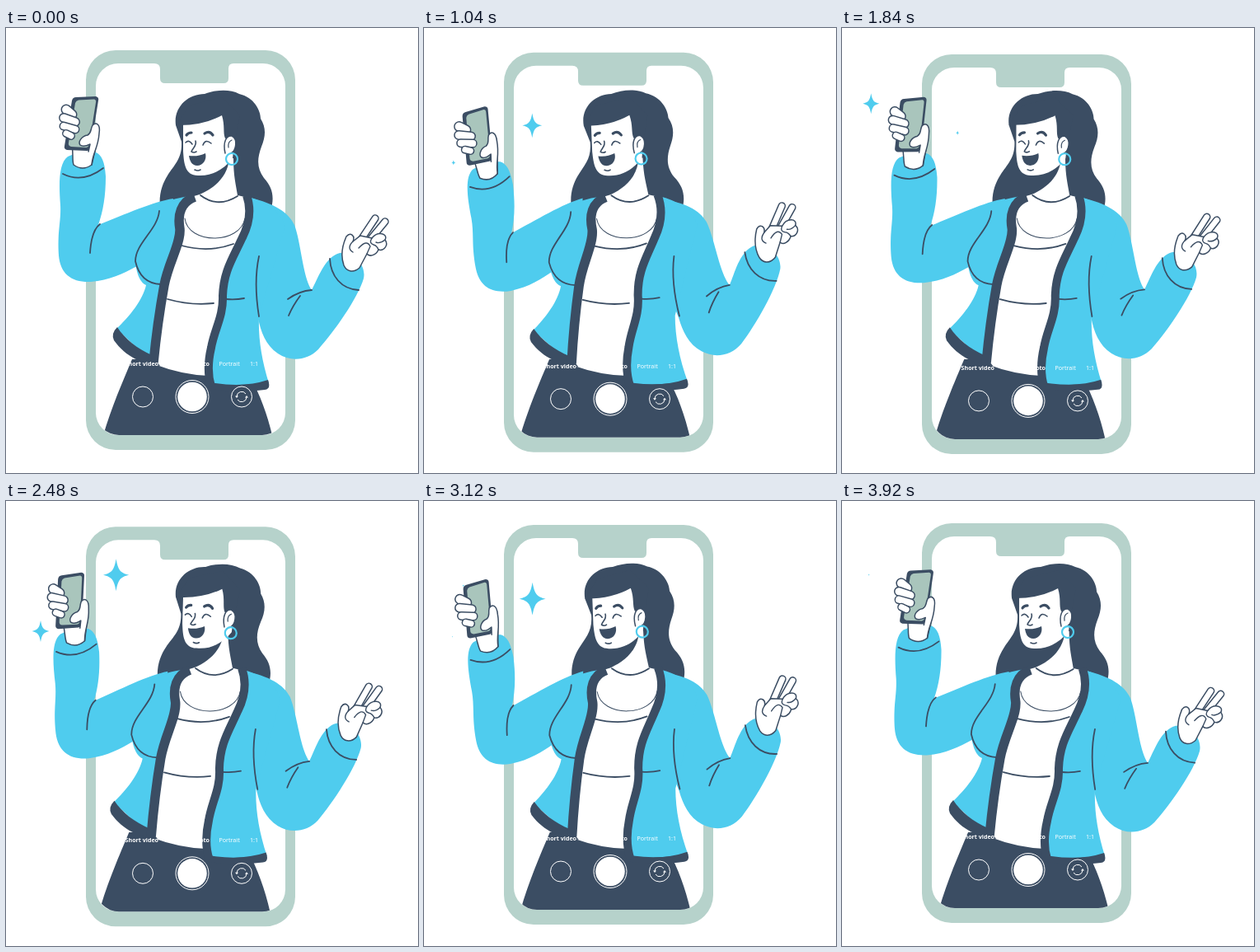
Write an HTML page that moves like this. It is 500 px wide and 540 px high and loops after 4 s.

```html
<!DOCTYPE html>
<html lang="en">
<head>
<meta charset="utf-8">
<title>Selfie</title>
<style>
html, body { margin: 0; width: 100%; height: 100%; overflow: hidden; background: #fff; }
svg { display: block; width: 500px; height: 540px; }
.ink { fill: #3b4d63; }
.sky { fill: #4fccee; }
.mint { fill: #b6d2cb; }
.white { fill: #fff; }
.line { fill: none; stroke: #3b4d63; stroke-width: 1.8; stroke-linecap: round; stroke-linejoin: round; }
.skin { fill: #fff; stroke: #3b4d63; stroke-width: 1.5; stroke-linejoin: round; stroke-linecap: round; }
.band { fill: none; stroke: #3b4d63; stroke-linejoin: round; }
.ring { fill: none; stroke: #fff; stroke-width: 1; }
text { font: 600 7.1px "Noto Sans", "Open Sans", sans-serif; fill: #fff; }
</style>
</head>
<body>
<svg viewBox="0 0 500 540">
  <defs>
    <clipPath id="screen"><rect id="screenBox" x="109" y="43" width="230" height="451" rx="28"/></clipPath>
  </defs>

  <g id="frame">
    <path class="mint" fill-rule="evenodd" d="M133 27H315A36 36 0 0 1 351 63V476A36 36 0 0 1 315 512H133A36 36 0 0 1 97 476V63A36 36 0 0 1 133 27Z
      M136 43A27 27 0 0 0 109 70V467A27 27 0 0 0 136 494H312A27 27 0 0 0 339 467V70A27 27 0 0 0 312 43H276Q270 43 270 49V61Q270 67 264 67H193Q187 67 187 61V50Q187 43 180 43Z"/>
  </g>

  <g clip-path="url(#screen)">
    <path id="skirt" class="ink" d="M153 402C142 428 126 465 117 498V506H324V498C318 472 309 446 297 425L240 400Z"/>
  </g>

  <g class="body"><g class="head">
    <path class="ink" d="M206 118C203 96 221 80 241 80C254 75 272 74 283 80C301 84 309 100 309 110C316 121 315 132 310 144C304 160 305 171 313 182C324 194 326 206 321 222L188 225C184 205 189 190 196 179C205 165 214 158 213 138Z"/>
  </g></g>

  <g class="body">
    <path class="white" d="M271 158C269 181 253 194 235 202L214 208L205 250L184 330L180 408Q214 421 246 422L262 340L298 240L294 206L281 203C279 190 276 180 276 158Z"/>
    <path class="line" d="M236 203Q257 219 281 204"/>
    <path class="line" style="stroke-width:1" d="M217 231C221 263 284 263 290 231"/>
    <path class="line" d="M213 264Q246 273 276 262M196 329Q224 337 252 334"/>
  </g>

  <g id="armL">
    <path class="sky" d="M75 156C64 164 64 188 66 215C67 235 62 247 64 276C66 299 80 309 103 308C126 306 142 298 157 290L178 285L200 230L203 207C178 211 145 226 112 239C118 222 121 204 121 180C120 162 116 154 109 151Q92 148 75 156Z"/>
    <path class="line" d="M69 177Q93 189 118 170M102 273C103 256 106 244 114 238"/>
  </g>

  <g class="armR">
    <path class="sky" d="M296 206C326 213 343 224 350 239C358 260 360 302 371 318C379 303 386 281 402 274C418 268 438 286 434 304C427 328 398 369 379 390C365 404 345 405 330 395C315 385 309 368 306 352L290 300Z"/>
  </g>

  <g class="body">
    <path class="sky" d="M224 204C206 206 194 210 180 217L157 285Q160 308 170 312C166 330 150 350 134 365L176 404L184 330Q194 290 210 260L209 226Z"/>
    <path class="sky" d="M294 205C318 212 332 222 339 240L307 350C306 376 310 402 319 431L248 435L250 385L264 335L269 292L292 248Z"/>
    <path class="ink" d="M135 363C144 377 159 389 177 397L187 410C166 408 145 399 131 379Q127 371 135 363Z"/>
    <path class="ink" d="M248 430Q288 437 318 427Q322 438 314 439C290 442 266 441 243 437Z"/>
    <path class="band" stroke-width="11.5" d="M229 205C212 211 208 227 211 244C212 262 197 285 192 312C186 345 182 375 179 406"/>
    <path class="band" stroke-width="10" d="M292 203C298 220 296 237 286 256C275 280 264 295 263 325C264 350 253 365 249 388C245 405 245 422 249 435"/>
    <path class="line" d="M186 222C184 245 157 261 157 283Q163 310 188 311M267 329Q279 330 289 328"/>
  </g>

  <g class="armR">
    <path class="line" d="M307 277C302 300 303 325 307 350M342 329Q356 319 371 318M343 349Q348 337 357 325M393 280C394 301 407 317 428 318"/>
  </g>

  <g class="body"><g class="head">
    <path class="white" d="M215 112V150C216 164 217 179 233 179C250 180 264 172 275 158L277 140L264 105Z"/>
    <path class="ink" d="M206 118Q238 119 262 106C266 119 263 127 266 134L279 132L284 106L262 84L222 94Z"/>
    <path class="skin" d="M266 152C263 139 267 130 274 131C282 135 279 149 273 152"/>
    <path class="line" d="M270 145Q269 138 274 136" style="stroke-width:1.2"/>
    <path class="line" style="stroke-width:3.2" d="M219 130Q221 127 225 127M241 128Q247 124 251 130"/>
    <path class="line" style="stroke-width:1.6" d="M218 139Q222 135 226 141M239 142Q242 134 249 140M230 137C232 143 226 146 225 150Q228 152 231 150M229 172Q233 174 236 172"/>
    <path class="ink" d="M222 155C229 156 236 155 242 152C244 160 239 167 232 167C226 167 223 162 222 155Z"/>
    <circle cx="274" cy="159" r="7" fill="none" stroke="#4fccee" stroke-width="2.2"/>
  </g></g>

  <g id="handL">
    <path class="skin" d="M80 143C82 153 80 160 82 166Q93 174 104 166L110 140Z"/>
    <path class="ink" d="M85 84L109 83Q113 84 112 88L103 144Q102 149 98 149L74 148Q70 147 71 143L80 88Q81 84 85 84Z"/>
    <path fill="#a9c5bc" d="M88 87.5L107 86.5Q109.500 87 109 90L101 141Q100 145 97 145L79 144Q75 143 76 139L84 91Q85 88 88 87.500Z"/>
    <path class="skin" d="M104 166C105 152 112 145 113 128C115 116 109 114 105 118C102 124 104 127 99 130C92 131 87 138 90 142Q94 145 102 141L100 150"/>
    <path class="white" d="M72 94L64 122L72 131L82 120Z"/>
    <g id="grip"></g>
  </g>

  <g id="handR">
    <g id="peace"></g>
    <path class="skin" d="M410 288C405 274 409 262 413 253C418 247 424 252 421 259L430 252L444 255C451 246 464 249 460 257C465 264 458 271 452 269C449 276 441 278 438 274L429 291C421 298 413 295 410 288Z"/>
    <path class="line" style="stroke-width:1.4" d="M421 259Q413 267 421 272M428 267Q438 256 442 265L438 274M444 255Q440 261 446 263Q450 264 452 269M460 257Q454 262 449 260"/>
  </g>

  <g id="ui">
    <text x="185" y="410" text-anchor="end">Short video</text>
    <text x="247" y="410" text-anchor="end">Photo</text>
    <text x="258.5" y="410" style="font-weight:500">Portrait</text>
    <text x="296" y="410" style="font-weight:400">1:1</text>
    <circle class="ring" cx="166" cy="447.5" r="12.5"/>
    <circle class="ring" cx="226" cy="447.5" r="20"/>
    <circle class="white" cx="226" cy="447.5" r="17.8"/>
    <circle class="ring" cx="286" cy="447.5" r="12.5"/>
    <path class="ring" d="M280 447A6 6 0 0 1 291 444M292 448A6 6 0 0 1 281 451"/>
    <path class="white" d="M278 446.500H282L280 449ZM290 448.500H294L292 446Z"/>
  </g>

  <g id="stars"></g>
</svg>
<script>
const NS = "http://www.w3.org/2000/svg";
const $ = id => document.getElementById(id);
const LOOP = 4000, STEP = 80;

function add(parent, name, attrs) {
  const el = document.createElementNS(NS, name);
  for (const key in attrs) el.setAttribute(key, attrs[key]);
  parent.appendChild(el);
  return el;
}

// A finger is a white capsule with an inked edge.
function finger(parent, x1, y1, x2, y2, w) {
  for (const [color, width] of [["#3b4d63", w], ["#fff", w - 3]]) {
    add(parent, "line", { x1, y1, x2, y2, stroke: color, "stroke-width": width, "stroke-linecap": "round" });
  }
}
finger($("peace"), 430, 258, 448, 231, 9.5);
finger($("peace"), 441, 258, 460, 235, 9.5);
finger($("grip"), 73, 99, 80, 105, 13);
finger($("grip"), 70, 109, 84, 114, 12);
finger($("grip"), 70, 119, 84, 123, 11);
finger($("grip"), 73, 128, 79, 131, 10);

// Start and end point, half height, then the times of growing and shrinking.
const stars = [
  { from: [133.5, 90], to: [134, 89], r: 19.5, life: [120, 430, 720, 920] },
  { from: [131, 118], to: [142, 129], r: 20, life: [860, 1130, 1540, 1930] },
  { from: [43, 157], to: [33, 166], r: 13, life: [150, 440, 700, 1200] },
  { from: [48, 103], to: [32, 89], r: 12.5, life: [1010, 1520, 1840, 1940] }
].map(s => ({ ...s, el: add($("stars"), "path", {
  class: "sky", d: "M0 -1C.13 -.3 .25 -.13 .8 0C.25 .13 .13 .3 0 1C-.13 .3 -.25 .13 -.8 0C-.25 -.13 -.13 -.3 0 -1Z"
}) }));

const ease = p => { p = Math.min(1, Math.max(0, p)); return p * p * (3 - 2 * p); };
const wave = (t, period) => (1 - Math.cos(2 * Math.PI * t / period)) / 2;
const set = (el, value) => el.setAttribute("transform", value);
const setAll = (cls, value) => document.querySelectorAll(cls).forEach(el => set(el, value));

function draw(t) {
  const sway = wave(t, LOOP);
  const swing = 2 * wave(t - 60, LOOP / 2) - 0.02;
  const nod = wave(t, LOOP / 4);
  const drop = `translate(0 ${5 * sway})`;

  set($("frame"), drop);
  set($("ui"), drop);
  $("screenBox").setAttribute("y", 43 + 5 * sway);
  set($("skirt"), `translate(${0.9 * swing - 5 * sway} 0)`);

  const k = 0.0217 * swing;
  setAll(".body", `matrix(1 ${-0.42 * k} ${k} 1 ${-352 * k - 4.2 * sway} ${103 * k})`);
  setAll(".head", `rotate(${2.6 * nod} 245 280)`);

  const left = `translate(${-2.65 * swing - 4.4 * sway} ${0.5 * swing}) rotate(${-3.5 * swing} 190 230)`;
  set($("armL"), left);
  set($("handL"), `${left} rotate(${-3.4 * swing - 1.4 * sway} 96 165)`);

  const right = `translate(${-2.4 * swing - 4.2 * sway} ${-0.8 * swing}) rotate(${-2.6 * swing} 325 240)`;
  setAll(".armR", right);
  set($("handR"), `${right} rotate(${-2.6 * swing} 412 287)`);

  const beat = t % (LOOP / 2);
  for (const { el, from, to, r, life: [a, b, c, d] } of stars) {
    const size = r * ease((beat - a) / (b - a)) * ease((d - beat) / (d - c));
    const p = Math.min(1, Math.max(0, (beat - a) / (d - a)));
    const [x, y] = from.map((v, i) => v + (to[i] - v) * p * p);
    set(el, `translate(${x} ${y}) scale(${size})`);
  }
}

const start = performance.now();
function tick() {
  const t = (performance.now() - start) % LOOP;
  draw(Math.floor(t / STEP) * STEP);
  requestAnimationFrame(tick);
}
tick();
</script>
</body>
</html>
```
